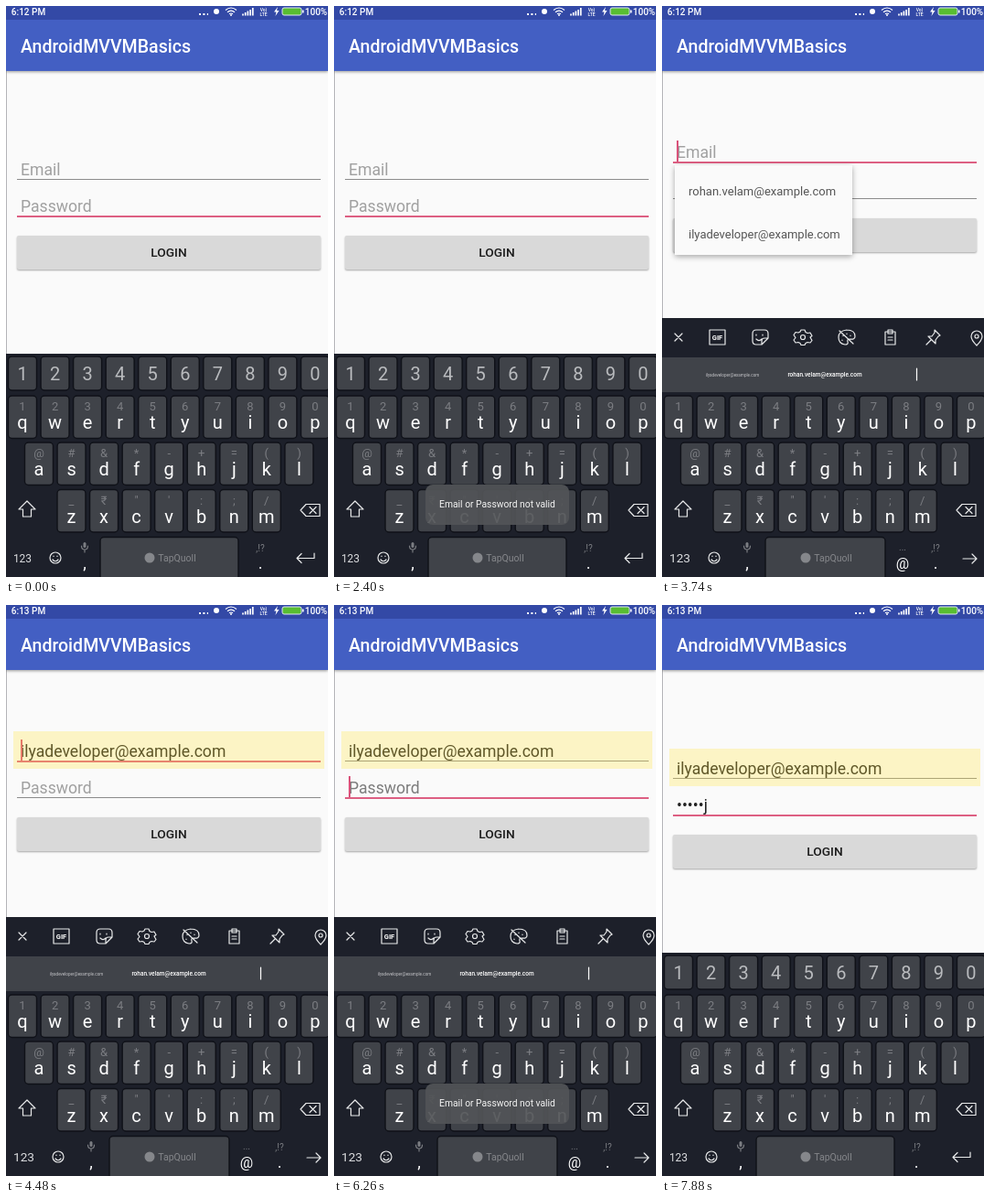
Write an HTML page that moves like this. It is 352 px wide and 624 px high and loops after 8000 ms.

```html
<!DOCTYPE html>
<html lang="en">
<head>
<meta charset="utf-8">
<title>Login screen</title>
<style>
html, body { margin: 0; width: 100%; height: 100%; overflow: hidden; }
#stage { position: relative; width: 352px; height: 624px; overflow: hidden; background: #fafafa; font-family: Roboto, sans-serif; }
#stage div, #stage > svg { position: absolute; }
.anim, .field i { animation: 8s step-end infinite; }

.edge { left: 0; top: 71px; width: 1px; height: 320px; background: #b4b4b8; }
.bar { left: 0; top: 0; width: 352px; height: 71px; background: #435fc3; box-shadow: 0 1px 3px #0006; }
.title { left: 16px; top: 33px; color: #fff; font-weight: 500; font-size: 19.56px; line-height: 24px; }

.form { inset: 0; animation-name: shift; }
.field { left: 16px; width: 328px; height: 24px; overflow: hidden; font-size: 17.6px; line-height: 26px; color: #212121; }
.field p { position: relative; margin: 0; height: 24px; white-space: nowrap; }
.field .hint { color: #a0a0a0; }
.field i { position: absolute; top: 0; width: 2px; height: 23px; background: #d9527a; opacity: 0; }
.email { top: 166px; }
.password { top: 206px; }
.email .strip { animation-name: fill; }
.password .strip { animation-name: type; }
.password .hint { animation-name: darken; }
.email i { animation-name: blink-email; }
.password i { animation-name: blink-password; }
.line { left: 12px; width: 332px; height: 1px; background: #8c8c8c; }
.focus { left: 12px; width: 332px; height: 2px; background: #dd5f82; }
.focus.e { top: 189px; opacity: 0; animation-name: focus-email; }
.focus.p { top: 229px; animation-name: focus-password; }
.glow { left: 8px; top: 157px; width: 340px; height: 41px; background: rgba(255,226,60,.28); opacity: 0; animation-name: show-filled; }

.button { left: 12px; top: 251px; width: 332px; height: 37px; border-radius: 2px; background: #d9d9d9; box-shadow: 0 1px 2px #0005; overflow: hidden; }
.press { inset: 0; background: #d1d3d1; opacity: 0; animation-name: press; }
.ripple { left: 144px; top: -21px; width: 78px; height: 78px; border-radius: 50%; background: rgba(0,0,0,.06); opacity: 0; animation-name: ripple; }
.label { inset: 0; text-align: center; font-weight: 500; font-size: 13.7px; line-height: 37px; color: #1c1c1c; }

.menu { left: 14px; top: 193px; width: 194px; height: 98px; background: #fafafa; box-shadow: 0 2px 6px #0005; opacity: 0; animation-name: menu; }
.menu p { margin: 0; padding: 6px 0 0 15px; height: 40.5px; font-size: 13px; line-height: 46px; color: #555; white-space: nowrap; }

.toast { left: 100px; top: 523px; width: 157px; height: 44px; border-radius: 8px; background: rgba(82,84,88,.93); color: #f4f4f4; font-size: 10.3px; line-height: 44px; text-align: center; opacity: 0; animation-name: toast; }

svg text { text-anchor: middle; }
.old { animation-name: hide-filled; }
.new { opacity: 0; animation-name: show-filled; }
.numeric { animation-name: hide-mail; }
.mail { opacity: 0; animation-name: show-mail; }
.pop { opacity: 0; animation-name: pop; }

@keyframes shift { 46.75% { transform: translateY(-19px); } 80% { transform: none; } }
@keyframes show-mail { 46.75% { opacity: 1; } 80% { opacity: 0; } }
@keyframes hide-mail { 46.75% { opacity: 0; } 80% { opacity: 1; } }
@keyframes show-filled { 52.375% { opacity: 1; } }
@keyframes hide-filled { 52.375% { opacity: 0; } }
@keyframes fill { 52.375% { transform: translateY(-24px); } }
@keyframes darken { 78.25% { color: #7c7c7c; } }
@keyframes type {
  83.75% { transform: translateY(-24px); }
  85.625% { transform: translateY(-48px); }
  89.25% { transform: translateY(-72px); }
  91% { transform: translateY(-96px); }
  92.875% { transform: translateY(-120px); }
}
@keyframes focus-email { 43.125% { opacity: 1; } 78.25% { opacity: 0; } }
@keyframes focus-password { 43.125% { opacity: 0; } 78.25% { opacity: 1; } }
@keyframes blink-email {
  43.125%, 54.25%, 67.25% { opacity: 1; }
  48.625%, 61.625%, 72.75% { opacity: 0; }
}
@keyframes blink-password {
  7.5%, 20.625%, 31.875%, 78.25% { opacity: 1; }
  13.125%, 26.25%, 39.375%, 98.5% { opacity: 0; }
}
@keyframes press {
  20.625%, 65.375% { opacity: .5; }
  22.5%, 67.25% { opacity: 1; }
  28.125%, 72.75% { opacity: .5; }
  30%, 74.5% { opacity: 0; }
}
@keyframes ripple {
  20.625%, 65.375% { opacity: 1; transform: scale(.4); }
  22.5%, 67.25% { opacity: 1; transform: none; }
  24.375%, 69% { opacity: .8; transform: scale(2.4); }
  26.25%, 70.875% { opacity: .5; transform: scale(4.6); }
  28.125%, 72.75% { opacity: 0; transform: none; }
}
@keyframes menu {
  43.125% { opacity: .4; }
  45% { opacity: 1; }
  52.375% { opacity: .3; }
  54.25% { opacity: 0; }
}
@keyframes toast {
  26.25% { opacity: .4; }
  28.125% { opacity: .75; }
  30% { opacity: 1; }
  43.125% { opacity: .5; }
  45% { opacity: .2; }
  46.75% { opacity: 0; }
  69% { opacity: .3; }
  70.875% { opacity: .6; }
  72.75% { opacity: .9; }
  74.5% { opacity: 1; }
  89.25% { opacity: .8; }
  91% { opacity: .4; }
  92.875% { opacity: 0; }
}
@keyframes pop { 0% { opacity: 1; } 1.75% { opacity: 0; } }
</style>
</head>
<body>
<div id="stage">
  <div class="edge"></div>
  <div class="form anim">
    <div class="line" style="top:189px"></div>
    <div class="line" style="top:229px"></div>
    <div class="focus e anim"></div>
    <div class="focus p anim"></div>
    <div class="field email"><div class="strip anim">
      <p class="hint"><i></i>Email</p>
      <p><i></i>ilyadeveloper@example.com</p>
    </div></div>
    <div class="field password"><div class="strip anim">
      <p class="hint anim"><i></i>Password</p>
      <p>g<i></i></p>
      <p>•b<i></i></p>
      <p>••x<i></i></p>
      <p>••••k<i></i></p>
      <p>•••••j<i></i></p>
    </div></div>
    <div class="glow anim"></div>
    <div class="button">
      <div class="press anim"></div>
      <div class="ripple anim"></div>
      <div class="label">LOGIN</div>
    </div>
    <div class="menu anim">
      <p>rohan.velam@example.com</p>
      <p>ilyadeveloper@example.com</p>
    </div>
  </div>
  <div class="bar"><div class="title">AndroidMVVMBasics</div></div>
  <svg id="status" width="352" height="15" fill="#fff" font-size="10" font-weight="500">
    <rect width="352" height="15" fill="#3349a6"/>
    <text class="old anim" x="24.5" y="9.5">6:12 PM</text>
    <text class="new anim" x="24.5" y="9.5">6:13 PM</text>
    <path d="M211 9h10" stroke="#fff" stroke-width="1.8" stroke-dasharray="2 2.4"/>
    <circle cx="230" cy="6" r="3"/>
    <g fill="none" stroke="#fff" stroke-width="1.2">
      <path d="M240 4.5q6-5 12 0M242 6.8q4-3.4 8 0M244 8.8q2-1.6 4 0"/>
      <path d="M259 10.5v-2M261.7 10.5v-3.5M264.4 10.5v-5M267.1 10.5v-6.5M269.8 10.5v-8.5" stroke-width="1.7"/>
    </g>
    <circle cx="246" cy="10" r="1"/>
    <text x="281.5" y="5.5" font-size="5">Vo)</text>
    <text x="281.5" y="10.5" font-size="5">LTE</text>
    <path d="M297 1l-4 5.5h2.5l-1 4.5 4-6h-2.5z"/>
    <rect x="302" y="2" width="21" height="8" rx="2" fill="#58bd32" stroke="#dfe6f5"/>
    <rect x="324" y="4.5" width="1.5" height="3"/>
    <text x="339" y="9.5">100%</text>
  </svg>
  <svg id="keyboard" width="352" height="624"></svg>
  <div class="toast anim">Email or Password not valid</div>
</div>
<script>
const BACK = '#1d202a', KEY = '#404349', DIM = '#7b7d82', PITCH = 35.55;

const text = (x, y, s, size, fill = '#fff', extra = '') =>
  `<text x="${x}" y="${y}" font-size="${size}" fill="${fill}" ${extra}>${s}</text>`;
const key = (x, y, w, h) =>
  `<rect x="${x}" y="${y}" width="${w}" height="${h}" rx="4" fill="${KEY}" stroke="#0f1118" stroke-width="1.4"/>`;
const icon = (d, color = '#e8e9ea') =>
  `<path d="${d}" fill="none" stroke="${color}" stroke-width="1.2" stroke-linejoin="round" stroke-linecap="round"/>`;
const ring = (x, y, r) => `M${x - r} ${y}a${r} ${r} 0 1 0 ${2 * r} 0a${r} ${r} 0 1 0 ${-2 * r} 0`;
const group = (name, body) => `<g class="${name} anim">${body}</g>`;

const row = (letters, hints, x, y) => [...letters].map((c, i) => {
  const cx = x + i * PITCH;
  return key(cx - 15.5, y, 31, 46.5) +
    text(cx, y + 16, hints[i], 13, DIM) + text(cx, y + 36, c, 20);
}).join('');

const numbers = [...'1234567890'].map((c, i) => {
  const cx = 18 + i * PITCH;
  return key(cx - 15.5, 383, 31, 37) + text(cx, 409, c, 20, '#b9bbbe');
}).join('');

const smiley = x => icon(ring(x, 603, 6) + `M${x - 3} 605q3 3.5 6 0M${x - 2} 601v.5M${x + 2} 601v.5`);
const mic = x => `<rect x="${x - 1.5}" y="586" width="3" height="6" rx="1.5" fill="${DIM}"/>` +
  icon(`M${x - 3.5} 590q0 4 3.5 4t3.5-4M${x} 594v3`, DIM);
const space = (x, w) => key(x, 580.5, w, 48) +
  `<circle cx="157" cy="603" r="5.5" fill="#85878b"/>` +
  text(187, 607, 'TapQuoll', 10.5, '#85878b');

const bottom = (size, face, comma, bar, width, dot) =>
  text(size > 13 ? 19.5 : 18, 608, '123', size, '#dcdde0') + smiley(face) +
  mic(comma) + text(comma, 615, ',', 18) + space(bar, width) +
  text(dot, 615, '.', 18) + text(dot, 596, ',!?', 10, DIM);

const tools = [
  'M14 358l8 8m0-8l-8 8',
  'M52 354h17v16h-17z',
  'M103 354h9q4 0 4 4v5l-7 7h-6q-4 0-4-4v-8q0-4 4-4M116 363h-4q-3 0-3 3v4M103 359v1M110 359v1M103 364q3 3 6 0',
  ring(154, 362, 2.5) + 'M152 354h4l1 2.5 2 1 3-.5 2 3.500-2 1.500 2 3.500-2 2.500-3-.5-2 1-1 2h-4l-1-2-2-1-3 .5-2-3 2-2.500-2-3 2-3 3 .5 2-1z'.replaceAll('00', ''),
  'M202 354q9 0 9 7 0 4-6 3-3 0-2 3 1 3-3 3-7-1-7-8t9-8M198 360v.5M202 358v.5M206 360v.5M197 365v.5M194 355l15 14',
  'M244 356h11v14h-11zM247 354h5v4h-5zM247 362h5M247 365h5',
  'M298 354l6 6-2 1-3 4v4l-8-8h4l3-4zM294 365l-5 5',
  'M344 371q-6-6-6-10a6 6 0 0 1 12 0q0 4-6 10' + ring(344, 361, 2)
];

const mailBoard =
  `<rect y="341" width="352" height="85" fill="${BACK}"/>` +
  tools.map(d => icon(d)).join('') +
  text(60.5, 365, 'GIF', 7.5, '#fff', 'font-weight="700"') +
  `<rect y="384" width="352" height="38" fill="${KEY}"/>` +
  text(77, 405, 'ilyadeveloper@example.com', 4.6, '#c4c5c8') +
  text(178, 405, 'rohan.velam@example.com', 6.5, '#fff', 'font-weight="500"') +
  icon('M278.5 396v13', '#fff') +
  bottom(13.7, 57, 93, 113, 131, 299) +
  text(263, 615, '@', 16) + text(263, 595, '...', 10, DIM) +
  icon('M329 604h15m-5-5l5 5-5 5');

const pop = (c, x, y, at) =>
  `<g class="pop anim" style="animation-delay:${at}ms">` + key(x - 17.5, y, 35, 100) +
  text(x, y + 35, c, 25, '#fff', 'font-weight="500"') + '</g>';

document.getElementById('keyboard').innerHTML =
  `<rect y="380" width="352" height="244" fill="${BACK}"/>` +
  group('numeric', numbers + bottom(12, 54, 86, 103, 151, 278) +
    icon('M337 598v5.5h-19m5-5l-5 5 5 5')) +
  group('mail', mailBoard) +
  row('qwertyuiop', '1234567890', 18, 426) +
  row('asdfghjkl', '@#&*-+=()', 36, 477) +
  row('zxcvbnm', '_₹"\':;/', 71.5, 528.5) +
  icon('M23 541l9 9h-4.5v8h-9v-8h-4.5z') +
  icon('M322 551l6-6.5h15v13h-15zM332 547.5l7 7m0-7l-7 7') +
  pop('G', 178, 425, 6700) + pop('B', 213.7, 476, 6850) +
  pop('X', 107, 476, 6990) + pop('J', 249, 425, 7280);
</script>
</body>
</html>
```
